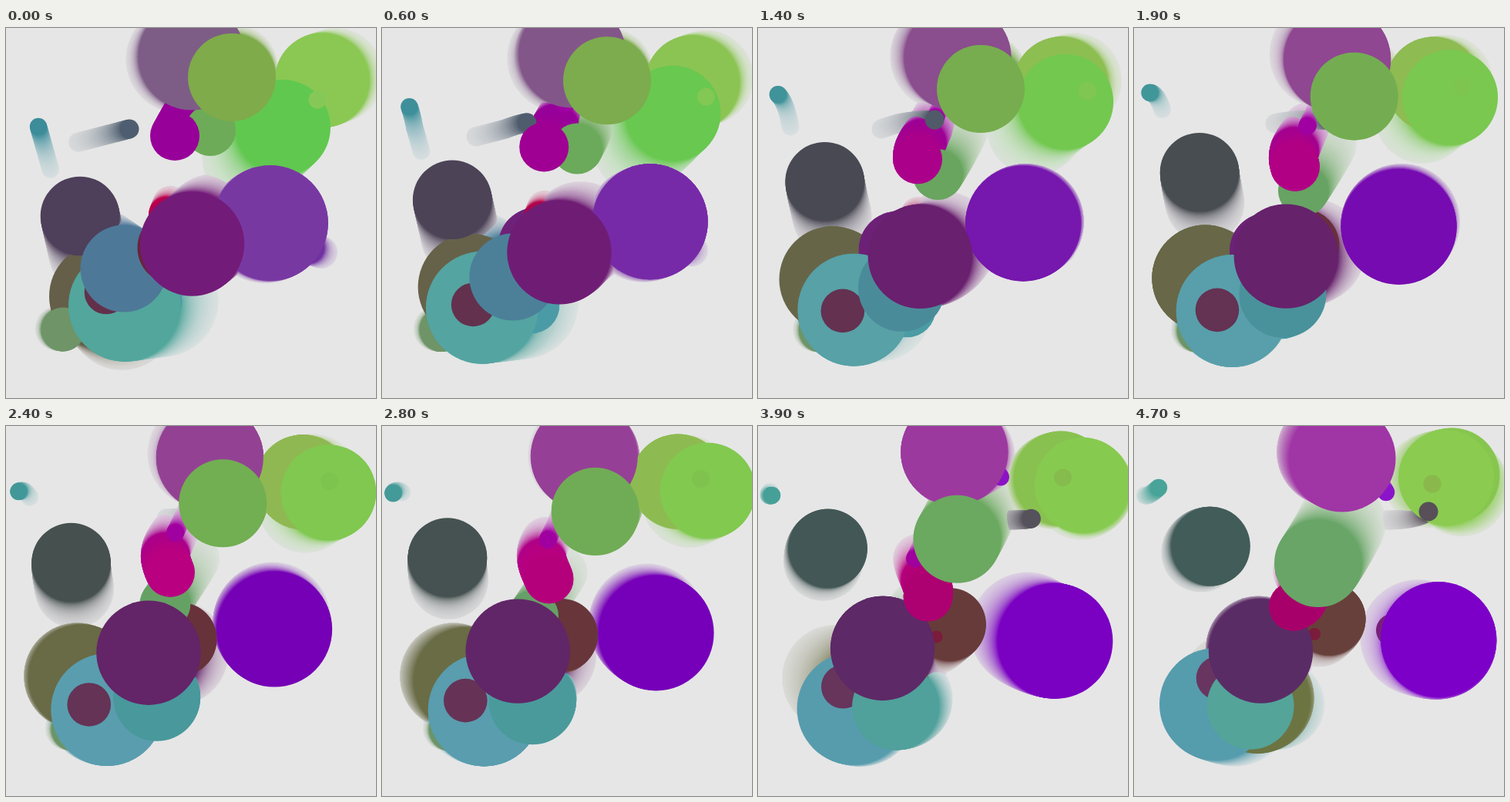
An HTML page with a canvas that plays this animation: 480x480 px, repeating every 4.8 s.

```html
<!DOCTYPE html>
<html lang="en">
<head>
<meta charset="utf-8">
<title>Drifting discs</title>
<style>
html, body { margin: 0; width: 100%; height: 100%; overflow: hidden; background: #e6e6e6; }
canvas { display: block; width: 480px; height: 480px; }
</style>
</head>
<body>
<canvas id="stage" width="480" height="480"></canvas>
<script>
const ctx = document.getElementById('stage').getContext('2d');
const LOOP = 4800, TICK = 100, END = LOOP - TICK;
const HISTORY = 1400, STEP = 50, FADE = 0.08, RUN_IN = 800;

const mix = (a, b, k) => a + (b - a) * k;
const rgb = hex => [1, 3, 5].map(i => parseInt(hex.slice(i, i + 2), 16));

// A disc follows a smooth curve through a few points, evenly spaced in time.
const disc = (r, colours, route, lags = [0]) => ({
  r, lags,
  colours: colours.split(' ').map(rgb),
  points: route.split(' ').map(p => p.split(',').map(Number))
});

// Neville's scheme: the one polynomial through all points.
function curve(points, t) {
  const u = t / END * (points.length - 1);
  let row = points;
  for (let span = 1; row.length > 1; span++) {
    row = row.slice(1).map((p, i) => p.map((c, axis) => mix(row[i][axis], c, (u - i) / span)));
  }
  return row[0];
}

// Before the loop begins, a disc arrives in a straight line.
function place({ points }, t) {
  if (t >= 0) return curve(points, t);
  const ahead = curve(points, RUN_IN);
  return points[0].map((c, axis) => mix(c, ahead[axis], t / RUN_IN));
}

function tint({ colours }, t) {
  const k = Math.max(t, 0) / END * (colours.length - 1);
  const i = Math.min(Math.floor(k), colours.length - 2);
  return `rgb(${colours[i].map((c, n) => Math.round(mix(c, colours[i + 1][n], k - i)))})`;
}

const magenta = ['#970099 #b80080 #a8006a', '219,140 207,166 212.5,189 221,214 207,234'];

// Back to front
const discs = [
  disc(69, '#655f4a #6c7442', '125,348 101,328 97,326 140,340 160,356'),
  disc(28.5, '#6f9468 #6a9468', '74,391 100,395'),
  disc(36.5, '#4c9aa8 #48a09c', '192,355 190,368 165,365'),
  disc(51.3, '#4e3f5a #46504f #425c5a', '96,244 86,195 86,166 99.5,156'),
  disc(49, '#6f207a #662470', '225,275 177,288 168,290 164,292'),
  disc(73, '#52a69c #5a9dae #559cad', '154,360 124,365 131,368 129,368 106,361'),
  disc(28.3, '#62304a #683560', '130,343 109,367 109,351 109,327'),
  disc(56.5, '#4e7898 #48989c #54a49a', '153,312 189,340 192.5,360 151,363'),
  disc(23, '#b8004c #8c1c40', '208,242 190,290'),
  disc(47.5, '#68243c #68403b', '218,285 215,285 238,267 253,250'),
  disc(8, '#7a1c3a #7a1c3a', '220,290 234,270'),
  disc(61.5, '#8ac853 #8fb852 #86c64f', '410,68 391,73 385,71 413,64'),
  disc(62, '#60c84f #80c850 #8acb50', '359,129 403,93.5 424.5,82 405,67'),
  disc(11.5, '#86c858 #7cc44e #8ab84c', '404,93 427,80 408,67 387,75'),
  disc(21, '#7030a0 #78207a', '392,285 335,265'),
  disc(75, '#7838a2 #7500b5 #7c00c8', '343,253 345,252.5 347.5,263 375,276.5 395,277'),
  disc(32, ...magenta, [1000, 750, 500, 250]),
  disc(11.5, '#a000a4 #a0009c', '245,85 195,190'),
  disc(33, '#6dab58 #5f9870', '265,133 229,197 188,258 165,295'),
  disc(12.5, '#4e5e70 #584f58', '160,131 238,119 320,122 382,111'),
  disc(67.7, '#731b78 #632468 #5a2c65', '241.5,280 206,296.5 170,290.5 164.5,292'),
  disc(32, ...magenta),
  disc(11.2, '#8c10b8 #8c14c8', '250,30 290,40 327,86'),
  disc(69.5, '#7d5d86 #934293 #a035a5', '241,37 256,37 264.5,41 256,35 270,42'),
  disc(57, '#7fab4b #72ae52 #68a567', '293,64 288,82 272,121 239,178'),
  disc(11.2, '#3c8c9a #48a498', '42,128 24,85 14,89 32,80')
];

function drawDisc(d, t) {
  ctx.fillStyle = tint(d, t);
  ctx.beginPath();
  ctx.arc(...place(d, t), d.r, 0, 2 * Math.PI);
  ctx.fill();
}

// Rebuild the fading trails from the recent past.
function render(now) {
  ctx.fillStyle = '#e6e6e6';
  ctx.fillRect(0, 0, 480, 480);
  for (let t = now - HISTORY; t <= now; t += STEP) {
    ctx.fillStyle = `rgba(230, 230, 230, ${FADE})`;
    ctx.fillRect(0, 0, 480, 480);
    for (const d of discs) for (const lag of d.lags) drawDisc(d, t - lag);
  }
}

let start, shown;
function loop(now) {
  start ??= now;
  const t = Math.floor((now - start) % LOOP / TICK) * TICK;
  if (t !== shown) render(shown = t);
  requestAnimationFrame(loop);
}
requestAnimationFrame(loop);
</script>
</body>
</html>
```
